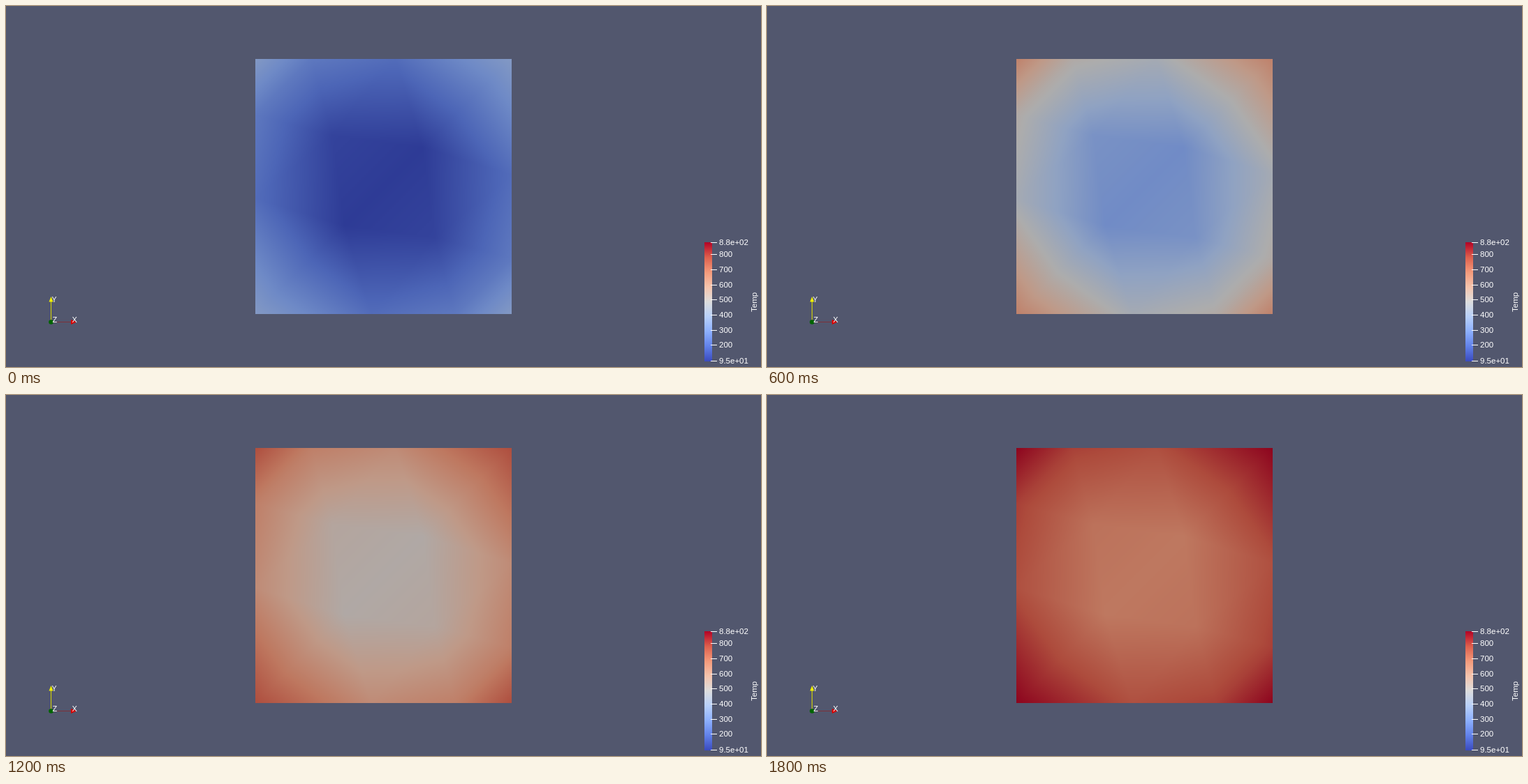
An HTML page with a canvas that plays this animation: 1081x518 px, repeating every 2 s.

```html
<!DOCTYPE html>
<html lang="en">
<head>
<meta charset="utf-8">
<title>Temperature field</title>
<style>
  html, body { margin: 0; width: 100%; height: 100%; overflow: hidden; background: #52576e; }
  canvas { display: block; }
</style>
</head>
<body>
<canvas id="stage" width="1081" height="518"></canvas>
<script>
const ctx = document.getElementById('stage').getContext('2d');
const STEP = 200, STEPS = 10;
const X0 = 357, Y0 = 76, W = 367, H = 366;
const SHADE = 0.78;

// Normalised temperature at the coldest and hottest point, per time step
const cold = [0, .08, .16, .26, .35, .44, .525, .6, .675, .75];
const hot = [.33, .52, .64, .72, .78, .82, .87, .91, .955, 1];

// Diverging blue to red scale
const stops = [
  [59, 76, 192], [98, 130, 234], [141, 176, 254], [184, 208, 249], [221, 221, 221],
  [245, 196, 173], [244, 154, 123], [222, 96, 77], [180, 4, 38]
];

function colour(t) {
  const p = Math.min(Math.max(t, 0), 1) * 8;
  const i = Math.min(Math.floor(p), 7);
  return stops[i].map((c, k) => c + (stops[i + 1][k] - c) * (p - i));
}

// Mesh nodes of the top wedge: x, y from the centre, and relative heat
const O = [0, 0, 0], A = [-73, -73, .07], B = [56, -56, 0],
      E = [-103, -184, .58], F = [17, -184, .45],
      P = [-143.5, -143.5, .58], M = [130, -130, .57],
      L = [-184, -184, 1], R = [184, -184, 1];
const mesh = [[O, A, B], [A, B, F], [A, F, E], [A, E, P], [E, P, L], [B, M, F], [F, M, R]];

function heat(x, y) {
  // Both diagonals are mirror axes
  if (y > x) [x, y] = [y, x];
  if (y > -x) [x, y] = [-y, -x];
  for (const [a, b, c] of mesh) {
    const d = (b[1] - c[1]) * (a[0] - c[0]) + (c[0] - b[0]) * (a[1] - c[1]);
    const u = ((b[1] - c[1]) * (x - c[0]) + (c[0] - b[0]) * (y - c[1])) / d;
    const v = ((c[1] - a[1]) * (x - c[0]) + (a[0] - c[0]) * (y - c[1])) / d;
    const w = 1 - u - v;
    if (Math.min(u, v, w) > -1e-6) return u * a[2] + v * b[2] + w * c[2];
  }
  return 0;
}

const field = new Float32Array(W * H);
for (let y = 0; y < H; y++)
  for (let x = 0; x < W; x++)
    field[y * W + x] = heat(x + .5 - W / 2, y + .5 - H / 2);

const plate = ctx.createImageData(W, H);

function drawPlate(step) {
  const lut = [];
  for (let i = 0; i <= 512; i++)
    lut.push(colour(cold[step] + (hot[step] - cold[step]) * i / 512).map(c => c * SHADE));
  field.forEach((u, i) => {
    const c = lut[Math.round(u * 512)];
    plate.data.set([c[0], c[1], c[2], 255], i * 4);
  });
  ctx.putImageData(plate, X0, Y0);
}

function text(s, x, y, size = 11.5) {
  ctx.font = size + 'px "Liberation Sans", Arial, sans-serif';
  ctx.fillStyle = '#fff';
  ctx.fillText(s, x, y);
}

function shape(fill, ...pts) {
  ctx.fillStyle = fill;
  ctx.beginPath();
  pts.forEach(p => ctx.lineTo(...p));
  ctx.fill();
}

function drawLegend() {
  const top = 339.5, bottom = 509.5;
  const bar = ctx.createLinearGradient(0, bottom, 0, top);
  stops.forEach((c, i) => bar.addColorStop(i / 8, `rgb(${c})`));
  ctx.fillStyle = bar;
  ctx.fillRect(1000, 339, 11, 171);

  const label = (value, s) => {
    const y = bottom - (value - 95) / 785 * (bottom - top);
    ctx.fillStyle = '#fff';
    ctx.fillRect(1009, Math.floor(y), 9, 1);
    text(s, 1021, Math.floor(y) + 4);
  };
  label(880, '8.8e+02');
  label(95, '9.5e+01');
  for (let v = 200; v <= 800; v += 100) label(v, String(v));

  ctx.save();
  ctx.translate(1075, 439);
  ctx.rotate(-Math.PI / 2);
  text('Temp', 0, 0);
  ctx.restore();
}

function drawAxes() {
  ctx.fillStyle = '#d8d800';
  ctx.fillRect(64, 424, 1, 28);
  shape('#f0f000', [64.5, 417], [67.5, 424.5], [61.5, 424.5]);
  ctx.fillStyle = '#7c3038';
  ctx.fillRect(67, 453, 27, 1);
  shape('#d80000', [101, 453.5], [93, 450], [93, 457]);
  ctx.fillStyle = '#006400';
  ctx.beginPath();
  ctx.arc(64.5, 453.5, 3.3, 0, Math.PI * 2);
  ctx.fill();
  text('Y', 65.5, 425, 10.5);
  text('Z', 66.5, 454, 11);
  text('X', 94.5, 454, 11);
}

ctx.fillStyle = '#52576e';
ctx.fillRect(0, 0, 1081, 518);
drawLegend();
drawAxes();

let shown = -1;
function tick() {
  const step = Math.floor(performance.now() / STEP) % STEPS;
  if (step !== shown) drawPlate(shown = step);
  requestAnimationFrame(tick);
}
tick();
</script>
</body>
</html>
```
